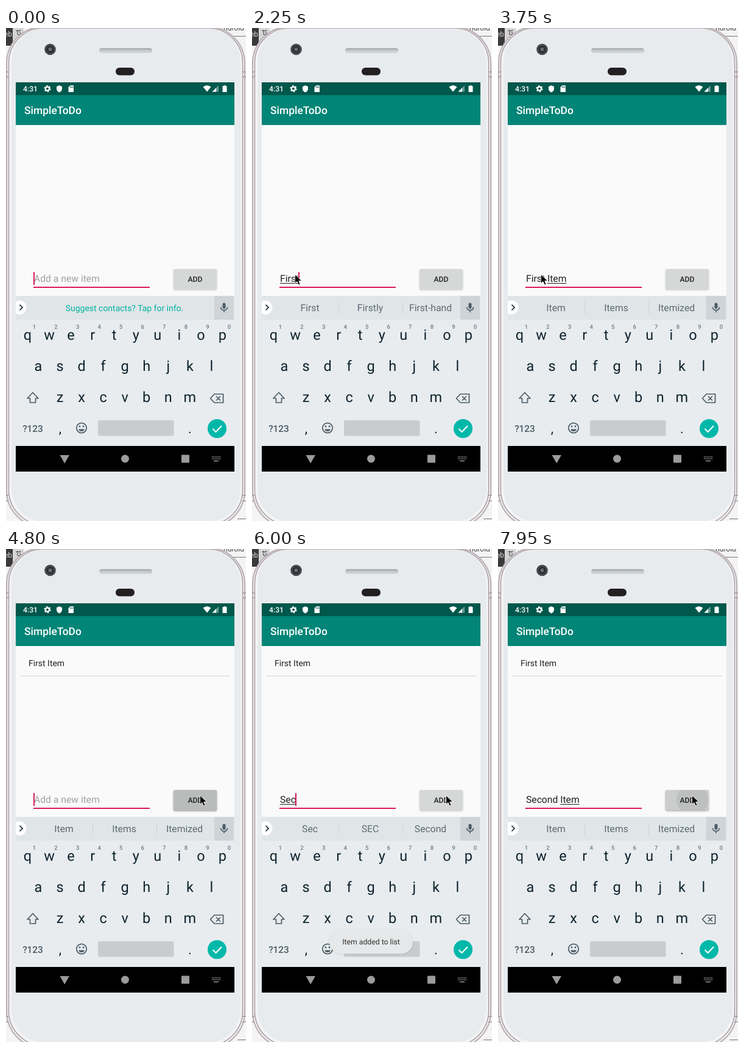
An HTML page that plays this animation: 394 px wide and 808 px high, repeating every 8 s.

```html
<!DOCTYPE html>
<html lang="en">
<head>
<meta charset="utf-8">
<title>To-do list</title>
<style>
  html, body { margin: 0; width: 100%; height: 100%; overflow: hidden; background: #f4f4f4; }
  #stage { position: relative; width: 394px; height: 808px; overflow: hidden; font-family: Roboto, sans-serif; }
  svg { position: absolute; left: 0; top: 0; }
  text { text-rendering: geometricPrecision; }
  .mid { text-anchor: middle; }
  .bold { font-weight: 500; }
  #keys { font-size: 23.5px; fill: #0d222c; }
  #digits { font-size: 9.5px; font-weight: 500; fill: #6d7a83; }
  #words { font-size: 15.7px; fill: #5b6972; }
  .line { fill: none; stroke: #4b5b66; stroke-width: 1.7; stroke-linejoin: round; }
  #field { position: absolute; left: 46px; top: 401px; height: 20px; line-height: 20px; font-size: 15.7px;
    white-space: pre; color: #212121; text-rendering: geometricPrecision; }
  #field u { text-decoration-thickness: 1px; text-underline-offset: 2px; }
  #hint { position: absolute; left: 0; color: #a0a0a0; }
  #caret { position: absolute; top: -1px; width: 2px; height: 21px; margin-left: -1px; background: #d81b60; }
</style>
</head>
<body>
<div id="stage">
<svg width="394" height="808" viewBox="0 0 394 808">
  <defs>
    <clipPath id="buttonClip"><rect x="275" y="395" width="71" height="33" rx="2"/></clipPath>
    <clipPath id="screenClip"><rect x="16" y="89" width="359" height="638"/></clipPath>
    <linearGradient id="slot" x2="0" y2="1">
      <stop stop-color="#9fa5a9"/><stop offset=".5" stop-color="#c4c9cc"/><stop offset="1" stop-color="#d5d9db"/>
    </linearGradient>
    <filter id="soft" x="-20%" y="-30%" width="140%" height="180%"><feGaussianBlur stdDeviation="1.5"/></filter>
  </defs>

  <!-- desktop behind the phone -->
  <rect width="394" height="808" fill="#f4f4f4"/>
  <rect width="11" height="29" fill="#3a3a3c"/>
  <text x="-3" y="14" font-size="12" fill="#d8d8d8">eb</text>
  <rect x="11" width="18" height="29" fill="#d4d4d4"/>
  <text transform="translate(24 12) rotate(-90)" font-size="11" fill="#333">ct</text>
  <text x="357" y="4" font-size="12" fill="#444">ndroid</text>
  <path d="M340 13.500H394M380 804.500H394" stroke="#777"/>

  <!-- phone body -->
  <rect x="1" y="-2" width="391" height="820" rx="60" fill="#efedee" stroke="#b9afb5" stroke-width="2"/>
  <rect x="4.500" y="0" width="384" height="814" rx="57" fill="#f4f3f4" stroke="#a69da3" stroke-width="1.500"/>
  <rect x="9" y="1" width="376" height="808" rx="54" fill="#e8ebed"/>
  <path d="M0 72H4M0 80H4M388 72H394M388 80H394M0 766H4M0 775H4M388 766H394M388 775H394" stroke="#a0979d" stroke-width="1.500"/>
  <circle cx="72.500" cy="35" r="9.300" fill="#45494d"/>
  <circle cx="72.500" cy="35" r="6" fill="#2b2e32"/>
  <circle cx="72.500" cy="35" r="3" fill="#686d74"/>
  <rect x="153" y="33" width="87" height="8" rx="4" fill="url(#slot)"/>
  <rect x="180" y="65" width="31" height="12.500" rx="6.200" fill="#231f20"/>

  <!-- app -->
  <rect x="16" y="89" width="359" height="350" fill="#fafafa"/>
  <rect x="16" y="89" width="359" height="21" fill="#00574b"/>
  <rect x="16" y="110" width="359" height="49" fill="#008577"/>
  <g fill="#fff">
    <text class="bold" x="28" y="104" font-size="12.200">4:31</text>
    <circle cx="68" cy="99.500" r="3.200" fill="none" stroke="#fff" stroke-width="2.300"/>
    <circle cx="68" cy="99.500" r="4.800" fill="none" stroke="#fff" stroke-width="1.700" stroke-dasharray="2.500 2.520"/>
    <path d="M87.500 94 92 96V99.500Q92 103.500 87.500 105.500 83 103.500 83 99.500V96Z"/>
    <path d="M105.500 94H111V105H102.500V97Z"/>
    <path d="M105.500 95.500V98M107.500 95.500V98M109.500 95.500V98" stroke="#00574b"/>
    <path d="M323.500 96.500Q330 91.500 336.500 96.500L330 104.500Z"/>
    <path d="M349 94V104.500H338.500Z" opacity=".4"/>
    <path d="M345 98V104.500H338.500Z"/>
    <path d="M357.500 94H360.500V95H362.500V105H355.500V95H357.500Z"/>
    <text class="bold" x="30" y="141" font-size="17.460">SimpleToDo</text>
  </g>
  <g id="item">
    <text x="37" y="192" font-size="13.970" fill="#212121">First Item</text>
    <path d="M24 208H368" stroke="#dedede" stroke-width="1.500"/>
  </g>
  <path d="M45 425H236" stroke="#d81b60" stroke-width="2"/>
  <rect id="shade" x="275" y="396.500" width="71" height="33" rx="2" filter="url(#soft)"/>
  <rect id="button" x="275" y="395" width="71" height="33" rx="2"/>
  <circle id="ripple" cx="319" cy="411" r="26" fill="#bec0bf" clip-path="url(#buttonClip)"/>
  <text class="bold mid" x="310.500" y="416" font-size="12.200" fill="#212121">ADD</text>

  <!-- keyboard -->
  <rect x="16" y="439" width="359" height="246" fill="#e8ecef"/>
  <rect x="16" y="439" width="359" height="39" fill="#e0e5e8"/>
  <rect x="342" y="439" width="32" height="39" fill="#cfd4d8"/>
  <circle cx="22" cy="458" r="11.500" fill="#fff" clip-path="url(#screenClip)"/>
  <path d="M22.500 453.500 27 458 22.500 462.500" fill="none" stroke="#1d2c35" stroke-width="1.700"/>
  <rect x="355.500" y="450.500" width="5" height="9.500" rx="2.500" fill="#4b5b66"/>
  <path class="line" d="M352.500 457.500Q353 462.500 358 462.500T363.500 457.500M358 462.500V466"/>
  <text id="tip" class="mid" x="194.500" y="463.500" font-size="13.970" fill="#00b3a1">Suggest contacts? Tap for info.</text>
  <g id="words"><path d="M142.500 449V468M247.500 449V468" stroke="#cbd1d5"/></g>
  <g id="digits"></g>
  <g id="keys"></g>
  <path id="shift" class="line" d="M44 597.500 53 607H48.500V614H39.500V607H35Z"/>
  <path class="line" d="M342 600H356.500V614H342L335.500 607ZM345 603.500 352 610.500M352 603.500 345 610.500"/>
  <text class="bold mid" x="44" y="661.500" font-size="15.400" fill="#4b5b66">?123</text>
  <text class="mid" x="89" y="664" font-size="22" fill="#0d222c">,</text>
  <text class="mid" x="302" y="664" font-size="22" fill="#0d222c">.</text>
  <circle class="line" cx="124" cy="655.500" r="8.200"/>
  <path d="M119 657.500H129Q128 661 124 661T119 657.500Z" fill="#4b5b66"/>
  <circle cx="121" cy="653" r="1.400" fill="#4b5b66"/><circle cx="127" cy="653" r="1.400" fill="#4b5b66"/>
  <rect x="151" y="643" width="124.500" height="25.500" rx="2.500" fill="#c8cccf"/>
  <circle cx="346.500" cy="656.500" r="15.500" fill="#00b8a9"/>
  <path d="M339.500 657 344.500 662 354 652" fill="none" stroke="#fff" stroke-width="2"/>

  <g id="toast">
    <rect x="127" y="625" width="137" height="39" rx="19.500" fill="#000" opacity=".13" filter="url(#soft)"/>
    <rect x="127" y="624" width="137" height="39.500" rx="19.700" fill="#e7e8e9"/>
    <text class="mid" x="195.500" y="648" font-size="12.220" fill="#303030">Item added to list</text>
  </g>

  <rect x="16" y="685" width="359" height="42"/>
  <g fill="#9b9b9b">
    <path d="M88.500 700H104L96.200 713.500Z"/>
    <circle cx="195.500" cy="706" r="6.500"/>
    <rect x="288" y="699.500" width="13" height="13" rx="1"/>
    <path d="M338 703H352M338 706H352" stroke="#9b9b9b" stroke-width="1.500" stroke-dasharray="1.500 1"/>
    <path d="M341 709.500H349" stroke="#9b9b9b" stroke-width="1.500"/>
  </g>
</svg>

<div id="field"><span id="hint">Add a new item</span><span id="done"></span><u id="typing"></u><i id="caret"></i></div>

<svg width="394" height="808" viewBox="0 0 394 808">
  <path id="mouse" d="M.500 0V14.500L4 11.500 6.500 17 9 16 6.700 10.500H11.500Z" fill="#000" stroke="#fff" stroke-width=".8"/>
</svg>
</div>

<script>
const $ = id => document.getElementById(id);
const LOOP = 8000, TICK = 150;

function addText(parent, x, y, label = '') {
  const el = document.createElementNS('http://www.w3.org/2000/svg', 'text');
  el.setAttribute('class', 'mid');
  el.setAttribute('x', x);
  el.setAttribute('y', y);
  el.textContent = label;
  return $(parent).appendChild(el);
}

const keys = [['qwertyuiop', 35.500, 511], ['asdfghjkl', 53, 562], ['zxcvbnm', 88.500, 613]]
  .flatMap(([row, x, y]) => [...row].map((letter, i) => ({ letter, y, el: addText('keys', x + i * 35.550, y) })));
[...'1234567890'].forEach((d, i) => addText('digits', 46.500 + i * 35.550, 493, d));
const words = [95, 194, 293].map(x => addText('words', x, 464));

// time, finished text, text being typed, caret shown, suggestions (kept when left out)
const typing = [
  [0, '', '', 1, ''],
  [750, '', '', 0],
  [1350, '', '', 1],
  [1650, '', 'F', 1, 'F For From'],
  [1800, '', 'Fi', 1, 'Fi Find First'],
  [1950, '', 'Firs', 1, 'Firs First Firsthand'],
  [2250, '', 'First', 1, 'First Firstly First-hand'],
  [2400, 'First ', '', 1, 'of time day'],
  [2700, 'First ', 'I', 1, 'I In It'],
  [3000, 'First ', 'Ite', 1, 'Ite Item Items'],
  [3150, 'First ', 'Item', 1, 'Item Items Itemized'],
  [3750, 'First ', 'Item', 0],
  [4350, 'First ', 'Item', 1],
  [4800, '', '', 1],
  [5250, '', 'S', 1, 'S So She'],
  [5550, '', 'Se', 1, 'Se See Sent'],
  [6000, '', 'Sec', 1, 'Sec SEC Second'],
  [6150, '', 'Seco', 1, 'Seco Second Seconds'],
  [6300, '', 'Second', 1, 'Second Seconds Secondary'],
  [6450, 'Second ', '', 1, 'time one half'],
  [6900, 'Second ', 'I', 1, 'I In It'],
  [7050, 'Second ', 'It', 1, 'It Its Item'],
  [7200, 'Second ', 'Ite', 1, 'Ite Item Items'],
  [7350, 'Second ', 'Item', 1, 'Item Items Itemized'],
  [7800, 'Second ', 'Item', 0]
];
typing.forEach((s, i) => s[4] ??= typing[i - 1][4]);

// time, fill, shadow strength, ripple shown
const presses = [
  [0, '#d6d7d7', .2, 0], [4650, '#cbcccc', .32, 1], [4800, '#b9bcbb', .4, 0],
  [4950, '#c8cac9', .3, 0], [5100, '#d6d7d7', .2, 0], [7950, '#cbcccc', .32, 1]
];
const toastFade = [[0, 0], [4950, .3], [5100, .75], [5250, 1], [7050, .6], [7200, .2], [7350, 0]];

const at = (list, t) => list.findLast(s => s[0] <= t);
const show = (id, on) => { $(id).style.visibility = on ? 'visible' : 'hidden'; };

function draw() {
  const t = performance.now() % LOOP;
  const [, done, typed, caret, suggestions] = at(typing, t);
  $('done').textContent = done;
  $('typing').textContent = typed;
  show('hint', !done && !typed);
  show('caret', caret);
  show('tip', !suggestions);
  show('words', suggestions);
  const list = suggestions.split(' ');
  words.forEach((el, i) => { el.textContent = list[i] || ''; });

  const caps = t >= 1500 && t < 1650;
  keys.forEach(({ letter, y, el }) => {
    el.textContent = caps ? letter.toUpperCase() : letter;
    el.setAttribute('y', caps ? y + 1.500 : y);
  });
  $('shift').style.fill = caps ? '#4b5b66' : 'none';

  const [, fill, shadow, ripple] = at(presses, t);
  $('button').style.fill = fill;
  $('shade').style.opacity = shadow;
  show('ripple', ripple);
  show('item', t >= 4800);
  $('toast').style.opacity = at(toastFade, t)[1];

  const step = Math.floor(t / TICK) * TICK;
  const k = Math.min(1, Math.max(0, (step - 3900) / 600));
  $('mouse').setAttribute('transform', `translate(${70 + 248 * k * k * (3 - 2 * k)} 404)`);
  show('mouse', t >= 300);
  requestAnimationFrame(draw);
}
draw();
</script>
</body>
</html>
```
